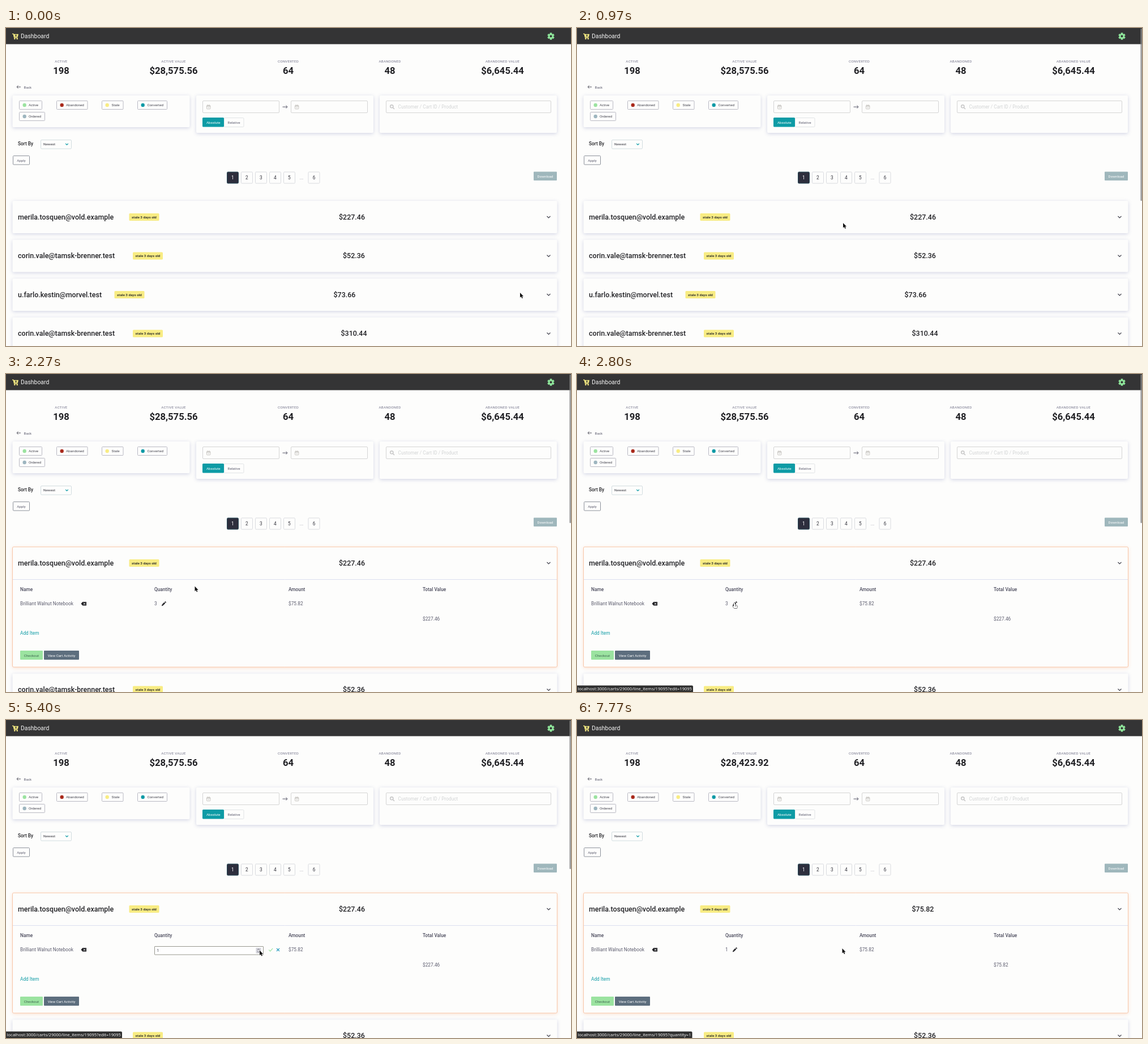
These frames come from a looping animation (998x561 px, 8000 ms). An HTML page with a canvas:

```html
<!DOCTYPE html>
<html lang="en">
<head>
<meta charset="utf-8">
<title>Dashboard</title>
<style>
html, body { margin: 0; width: 100%; height: 100%; overflow: hidden; background: #fdfdfc; }
canvas { display: block; width: 998px; height: 561px; }
</style>
</head>
<body>
<canvas id="stage" width="998" height="561"></canvas>
<script>
const ctx = document.getElementById('stage').getContext('2d');
const LOOP = 8000;
const BG = '#fdfdfc', INK = '#212125', SLATE = '#5c5c6e', TEAL = '#0d9ba5';
const GREEN = '#9be3a0', YELLOW = '#f8ec83';
const SM = 6.24, MD = 8.32, LG = 12.48, XL = 16.64;

// Moments of the scenario, in ms
const AT = { bar: 60, focus: 1600, open: 1730, hover: 2560, edit: 3400,
  two: 4500, one: 4930, check: 6230, saved: 6870, fade: 7300 };

const ROWS = [
  ['merila.tosquen@vold.example', 244, '$227.46', 588],
  ['corin.vale@tamsk-brenner.test', 250.5, '$52.36', 595],
  ['u.farlo.kestin@morvel.test', 218, '$73.66', 578.5],
  ['corin.vale@tamsk-brenner.test', 250.5, '$310.44', 591.5]
];

// Pointer stops: time, x, y
const PATH = [
  [0, 908, 467], [60, 908, 467], [900, 470, 344], [1000, 470, 344],
  [1500, 400, 340], [1900, 400, 340], [2600, 278, 403.5], [3480, 278, 403.5],
  [4150, 448, 406.5], [5860, 448, 406.5], [6300, 470, 403], [6800, 470, 403],
  [6900, 468.5, 403], [LOOP, 468.5, 403]
];

function text(s, x, y, size, color, { w = 400, align = 'left', font = 'Roboto', ls = 0 } = {}) {
  ctx.font = `${w} ${size}px ${font}, sans-serif`;
  ctx.letterSpacing = ls + 'px';
  ctx.textAlign = align;
  ctx.fillStyle = color;
  ctx.fillText(s, x, y + size * 0.355);
}

const mid = (s, x, y, size, color, w = 400) => text(s, x, y, size, color, { w, align: 'center' });

function box(x, y, w, h, fill, stroke, r = 1.5) {
  ctx.beginPath();
  ctx.roundRect(x, y, w, h, r);
  if (fill) { ctx.fillStyle = fill; ctx.fill(); }
  if (stroke) { ctx.strokeStyle = stroke; ctx.lineWidth = 1; ctx.stroke(); }
}

function line(color, width, ...pts) {
  ctx.beginPath();
  for (let i = 0; i < pts.length; i += 2) ctx.lineTo(pts[i], pts[i + 1]);
  ctx.strokeStyle = color;
  ctx.lineWidth = width;
  ctx.stroke();
}

function dot(x, y, r, color) {
  ctx.beginPath();
  ctx.arc(x, y, r, 0, Math.PI * 2);
  ctx.fillStyle = color;
  ctx.fill();
}

function card(x, y, w, h, focus) {
  ctx.save();
  ctx.shadowColor = focus ? 'rgba(245,150,100,.3)' : 'rgba(110,115,175,.3)';
  ctx.shadowBlur = 6;
  ctx.shadowOffsetY = 1.5;
  box(x, y, w, h, BG, null, 2);
  ctx.restore();
  if (focus) box(x, y, w, h, null, '#f8c6a8', 2);
}

const chevron = (x, y, r, color, width = 1.2) =>
  line(color, width, x - r, y - r / 2, x, y + r / 2, x + r, y - r / 2);

function cart() {
  line(YELLOW, 1.3, 11, 10.3, 13, 10.3, 14.7, 17, 20.6, 17);
  ctx.beginPath();
  [[13.2, 10.8], [22, 10.8], [20.8, 15.8], [14.4, 15.8]].forEach(p => ctx.lineTo(...p));
  ctx.fillStyle = YELLOW;
  ctx.fill();
  dot(15.3, 19, 1.2, YELLOW);
  dot(19.8, 19, 1.2, YELLOW);
  line('#343435', 1, 17.5, 11.4, 17.5, 15);
  line('#343435', 1, 15.7, 13.2, 19.3, 13.2);
}

function gear(x, y) {
  ctx.save();
  ctx.translate(x, y);
  ctx.fillStyle = '#8fe69b';
  for (let i = 0; i < 6; i++) {
    ctx.fillRect(-1.8, -6.2, 3.6, 4);
    ctx.rotate(Math.PI / 3);
  }
  ctx.restore();
  dot(x, y, 4.7, '#8fe69b');
  dot(x, y, 2, '#343435');
}

function arrow(x0, x1, y, dir, color) {
  const tip = dir > 0 ? x1 : x0;
  line(color, 1, x0, y, x1, y);
  line(color, 1, tip - 2.6 * dir, y - 2.6, tip, y, tip - 2.6 * dir, y + 2.6);
}

function calendar(x, y) {
  const c = '#c9c7c3';
  box(x + .5, y + 1.5, 6.4, 6.4, null, c, 1);
  line(c, 1.4, x, y + 3, x + 7, y + 3);
  line(c, 1, x + 2, y, x + 2, y + 2);
  line(c, 1, x + 5, y, x + 5, y + 2);
  line(c, .8, x + 2, y + 5.6, x + 5.4, y + 5.6);
}

function chip(label, x, y, w, color, tx) {
  box(x + .5, y + .5, w - 1, 15, BG, '#b9b9c3', 1);
  dot(x + 9.7, y + 8, 3.2, color);
  text(label, tx, y + 8, SM, '#44444f');
}

function header() {
  ctx.fillStyle = '#343435';
  ctx.fillRect(0, 0, 998, 28.5);
  cart();
  text('Dashboard', 26, 14.7, 10.4, '#f4f4f4');
  gear(962.5, 14.6);
}

function stats(saved) {
  [['ACTIVE', '198', 97.5],
   ['ACTIVE VALUE', saved ? '$28,423.92' : '$28,575.56', 296],
   ['CONVERTED', '64', 498.5],
   ['ABANDONED', '48', 678],
   ['ABANDONED VALUE', '$6,645.44', 877]].forEach(([label, value, x]) => {
    text(label, x, 58.3, SM, '#73738a', { align: 'center', ls: .22 });
    mid(value, x, 75, XL, INK, 700);
  });
}

function filters() {
  arrow(19, 26, 104, -1, '#555560');
  text('Back', 31.5, 104.3, SM, SLATE);

  card(11.5, 119, 313, 56);
  card(336, 119, 313, 66);
  card(660, 119, 313, 66);
  chip('Active', 23, 128, 41, GREEN, 40);
  chip('Abandoned', 89, 128, 55.5, '#a92a1c', 106);
  chip('Stale', 169, 128, 38.5, YELLOW, 186.5);
  chip('Converted', 232, 128, 53, '#0d9aa6', 249.5);
  chip('Ordered', 23, 148, 46, '#9db5bf', 40);

  for (const x of [347.5, 503.5]) {
    box(x, 128.5, 135, 21, BG, '#d5d5d5');
    calendar(x + 6.5, 135);
  }
  arrow(488.5, 497, 139.2, 1, '#555566');
  box(385, 158.5, 35, 16, BG, '#e1e4e6');
  box(347, 158, 38, 16.5, TEAL);
  mid('Absolute', 366.2, 166.3, SM, '#fff');
  mid('Relative', 402.5, 166.3, SM, SLATE);

  box(671.5, 128.5, 291, 21, BG, '#d5d5d5');
  ctx.beginPath();
  ctx.arc(681.3, 138.3, 2.6, 0, Math.PI * 2);
  ctx.strokeStyle = '#c4c4c4';
  ctx.lineWidth = 1.4;
  ctx.stroke();
  line('#c4c4c4', 1.5, 683.2, 140.2, 686, 143);
  text('Customer / Cart ID / Product', 692.5, 139.2, MD, '#d2d4d5');

  text('Sort By', 21, 203.6, MD, INK, { w: 500 });
  box(61.5, 197.5, 54, 15.5, BG, '#d2dde0');
  text('Newest', 66, 205.2, SM, '#33333c');
  chevron(107.5, 205, 2.3, TEAL, 1.3);
  box(12.5, 225.5, 29, 15.5, BG, '#8d929b', 1);
  mid('Apply', 27, 233.3, SM, SLATE);
}

function pager() {
  '12345'.split('').forEach((n, i) => {
    const x = 390 + 25 * i;
    box(x + .5, 254, 20, 20, i ? BG : '#2d2e3d', i ? '#d9dbdf' : '#274a58');
    mid(n, x + 10.3, 264, MD, i ? '#33333c' : '#fff');
  });
  mid('...', 522, 264, MD, '#9a9aa5');
  box(534, 254, 20, 20, BG, '#d9dbdf');
  mid('6', 544, 264, MD, '#33333c');
  box(932, 253.5, 41, 15.5, '#9fb7bc', null, 1);
  mid('Download', 952.5, 261.3, SM, '#fff');
}

function pencil(x, y) {
  line(INK, 2.6, x + 1.6, y + 6.6, x + 5.4, y + 2.8);
  line(INK, 2.6, x + 6, y + 2.2, x + 7.2, y + 1);
  ctx.beginPath();
  [[x, y + 8.4], [x + .5, y + 5.7], [x + 2.7, y + 7.9]].forEach(p => ctx.lineTo(...p));
  ctx.fillStyle = INK;
  ctx.fill();
}

function quantity(t) {
  if (t < AT.edit || t >= AT.saved) {
    text(t < AT.edit ? '3' : '1', 262, 405.2, MD, SLATE);
    pencil(275, 400.8);
    return;
  }
  const active = t < AT.check;
  box(262.5, 399.5, 192, 14.5, '#fefefe', active ? '#98988f' : '#c0c0bc', .5);
  text(t < AT.two ? '3' : t < AT.one ? '2' : '1', 266.5, 407, 7, '#44444f');
  box(441.5, 402, 9, 9.5, active && t > 4100 ? '#d3d3da' : '#ececec', null, .5);
  line('#70707c', .9, 444, 405.7, 446, 403.9, 448, 405.7);
  line('#70707c', .9, 444, 408.1, 446, 409.9, 448, 408.1);
  line(GREEN, 1.2, 464.3, 405.4, 466.6, 407.8, 471.2, 402.8);
  line('#1593bb', 1.2, 478, 402.8, 483, 407.8);
  line('#1593bb', 1.2, 483, 402.8, 478, 407.8);
}

function details(t) {
  line('#dcdff0', 1, 12, 362.5, 973, 362.5);
  ['Name', 'Quantity', 'Amount', 'Total Value'].forEach((s, i) =>
    text(s, 25 + 237 * i, 380.2, MD, '#4a4a5c', { w: 500 }));
  text('Brilliant Walnut Notebook', 25, 405.2, MD, SLATE);

  ctx.beginPath();
  [[132.5, 405.3], [135.3, 402], [142, 402], [142, 408.6], [135.3, 408.6]].forEach(p => ctx.lineTo(...p));
  ctx.fillStyle = INK;
  ctx.fill();
  line('#fff', 1, 136.8, 403.6, 140.2, 407);
  line('#fff', 1, 140.2, 403.6, 136.8, 407);

  quantity(t);
  text('$75.82', 499, 405.2, MD, SLATE);
  text(t < AT.saved ? '$227.46' : '$75.82', 736, 432.2, MD, SLATE);
  text('Add Item', 25, 457, MD, TEAL);
  box(25, 488, 40, 16, GREEN, null, 1);
  mid('Checkout', 45, 496.3, SM, '#3f6650');
  box(67, 488, 62, 16, '#5d6e7e', null, 1);
  mid('View Cart Activity', 98, 496.3, SM, '#fff');
}

function rows(t) {
  const open = t >= AT.open;
  ROWS.forEach(([mail, badge, price, px], i) => {
    const y = 305 + 68.5 * i + (open && i ? 155 : 0);
    if (y > 561) return;
    const cy = y + 28.5;
    card(11.5, y, 962, open && !i ? 212 : 57, !i && t >= AT.focus);
    text(mail, 21, cy, LG, INK, { w: 500 });
    box(badge - 26.5, cy - 6.5, 53, 13, YELLOW);
    mid('stale 3 days old', badge, cy + .2, SM, '#36362e', 700);
    const paid = !i && t >= AT.saved;
    text(paid ? '$75.82' : price, paid ? 591.5 : px, cy, LG, INK, { w: 500 });
    chevron(958.5, cy, 3, '#44444f');
  });
  if (open) details(t);
}

function statusBar(t) {
  if (t < AT.hover) return;
  const edit = t < AT.check;
  box(0, 549.5, edit ? 205 : 203.5, 12, '#2f2f2f', null, [0, 2, 0, 0]);
  text('localhost:3000/carts/29000/line_items/19095?' + (edit ? 'edit=19095' : 'quantity=1'),
    1.5, 555.6, 7.55, '#f2f2f2', { font: '"Noto Sans"' });
}

function scrollbar(t) {
  if (t < AT.bar) return;
  ctx.globalAlpha = Math.max(0, Math.min(1, 1 - (t - AT.fade) / 300));
  box(995.6, 1, 2, t < AT.open ? 304 : 262, '#858585', null, 1);
  ctx.globalAlpha = 1;
}

const ARROW = new Path2D('M0 0V8.6L2 6.8L3.4 10L4.9 9.3L3.5 6.3H6.1Z');
const HAND = new Path2D('M-1 .8Q0 -.6 1 .8V4L4.3 4.7Q5.4 5 5.2 6.3L4.6 9.8H-.4L-3 6.6Q-3.2 5.4 -2 5.7L-1 6.5Z');

function pointer(t) {
  const i = PATH.findIndex(p => p[0] > t);
  const [ta, xa, ya] = PATH[i - 1], [tb, xb, yb] = PATH[i];
  const k = (t - ta) / (tb - ta), e = k * k * (3 - 2 * k);
  const hand = (t >= AT.hover && t < 3500) || (t >= AT.check && t < AT.saved);
  ctx.save();
  ctx.translate(xa + (xb - xa) * e, ya + (yb - ya) * e);
  ctx.lineJoin = 'round';
  ctx.lineWidth = 1;
  ctx.strokeStyle = hand ? '#111' : '#fff';
  ctx.fillStyle = hand ? '#fff' : '#111';
  const shape = hand ? HAND : ARROW;
  ctx.stroke(shape);
  ctx.fill(shape);
  if (hand) {
    line('#111', .6, 1.6, 5, 1.6, 6.6);
    line('#111', .6, 3.2, 5.2, 3.2, 6.8);
  }
  ctx.restore();
}

function draw(t) {
  ctx.fillStyle = BG;
  ctx.fillRect(0, 0, 998, 561);
  header();
  stats(t >= AT.saved);
  filters();
  pager();
  rows(t);
  statusBar(t);
  scrollbar(t);
  pointer(t);
}

const start = performance.now();
function tick() {
  draw((performance.now() - start) % LOOP);
  requestAnimationFrame(tick);
}
tick();
</script>
</body>
</html>
```
